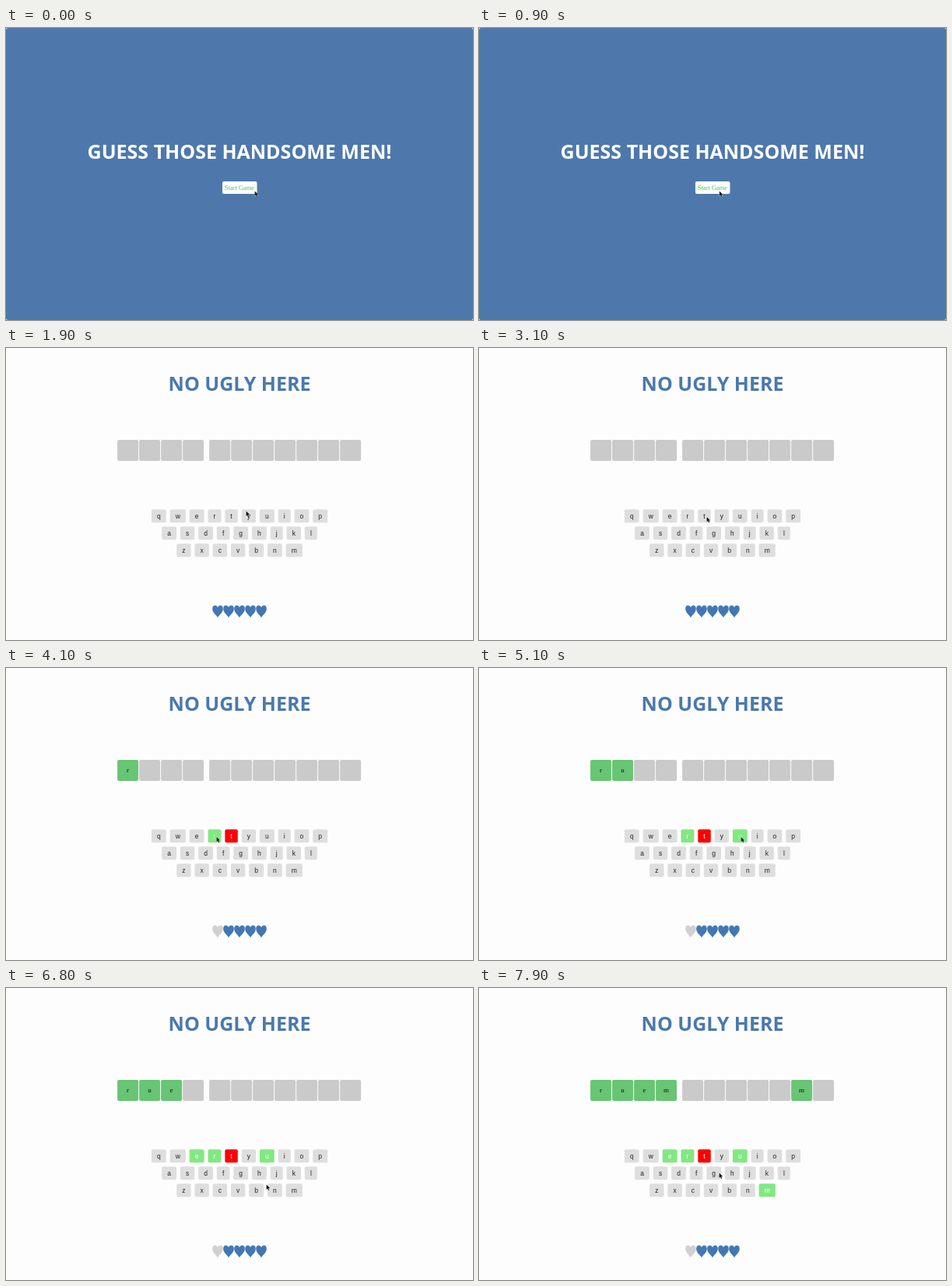
Recreate the animation shown at these times as an HTML page with a canvas. Size 600x375 px, loop 8 s.

```html
<!DOCTYPE html>
<html lang="en">
<head>
<meta charset="utf-8">
<title>Guessing game</title>
<style>
  html, body { margin: 0; width: 100%; height: 100%; overflow: hidden; background: #fdfdfd; }
  canvas { display: block; width: 600px; height: 375px; }
</style>
</head>
<body>
<canvas id="stage" width="600" height="375"></canvas>
<script>
const ctx = document.getElementById('stage').getContext('2d');
const LOOP = 8000, GAME_START = 1900;
const BLUE = '#4a78b0';
const TITLE = 'bold 25px "Open Sans", sans-serif';
const SERIF = '"Liberation Serif", serif';
const KEY_FONT = '8.5px "Liberation Sans", sans-serif';

// each pressed key: time and the tiles it fills
const PRESSES = {
  t: { at: 3400, tiles: [] },
  r: { at: 4000, tiles: [0] },
  u: { at: 4900, tiles: [1] },
  e: { at: 6450, tiles: [2] },
  m: { at: 7350, tiles: [3, 9] }
};

function box(x, y, w, h, fill, r = 2) {
  ctx.fillStyle = fill;
  ctx.beginPath();
  ctx.roundRect(x, y, w, h, r);
  ctx.fill();
}

function label(text, x, y, font, fill) {
  ctx.font = font;
  ctx.fillStyle = fill;
  ctx.fillText(text, x, y);
}

function layoutKeys() {
  const gap = 4.9, padding = 14.1;
  ctx.font = KEY_FONT;
  return ['qwertyuiop', 'asdfghjkl', 'zxcvbnm'].flatMap((row, i) => {
    const widths = [...row].map(c => ctx.measureText(c).width + padding);
    const total = widths.reduce((a, b) => a + b) + gap * (row.length - 1);
    let x = 300 - total / 2;
    return [...row].map((letter, j) => {
      const key = { letter, x, y: 207.3 + 22 * i, w: widths[j], h: 17 };
      x += key.w + gap;
      return key;
    });
  });
}

// The pointer rests on every key around its press and wanders in between.
function planRoute() {
  const stops = [
    { at: 0, x: 320, y: 210 },
    { at: 1000, x: 309, y: 210 },
    { at: 2000, x: 309, y: 210 },
    { at: 2400, x: 335, y: 216 },
    { at: 5800, x: 243, y: 229 },
    { at: 6800, x: 335, y: 253 },
    { at: 7900, x: 309, y: 238 },
    { at: LOOP, x: 309, y: 238 }
  ];
  for (const { letter, x, y, w } of keys) {
    const press = PRESSES[letter];
    if (!press) continue;
    for (const offset of [-250, 150])
      stops.push({ at: press.at + offset, x: x + w / 2 + 3, y: y + 10 });
  }
  return stops.sort((a, b) => a.at - b.at);
}

function pointerAt(t) {
  const i = route.findIndex(stop => stop.at > t);
  const a = route[i - 1], b = route[i];
  const u = (t - a.at) / (b.at - a.at), k = u * u * (3 - 2 * u);
  return [a.x + (b.x - a.x) * k, a.y + (b.y - a.y) * k];
}

function drawPointer([x, y]) {
  ctx.save();
  ctx.translate(x - 0.4, y - 0.4);
  const arrow = new Path2D('M0 0V6.3L1.5 5L2.5 7.3L3.6 6.8L2.6 4.6L4.5 4.5Z');
  ctx.strokeStyle = '#ffffffb0';
  ctx.stroke(arrow);
  ctx.fillStyle = '#111';
  ctx.fill(arrow);
  ctx.restore();
}

function drawHeart(x, fill) {
  ctx.save();
  ctx.translate(x, 330.3);
  ctx.fillStyle = fill;
  ctx.fill(new Path2D('M0 3C-1.2-.8-6.8-.8-6.8 4.6C-6.8 9.6-2.2 11.8 0 15.9C2.2 11.8 6.8 9.6 6.8 4.6C6.8-.8 1.2-.8 0 3Z'));
  ctx.restore();
}

function drawStart() {
  box(0, 0, 600, 375, '#4e78ac', 2.5);
  label('GUESS THOSE HANDSOME MEN!', 300, 168, TITLE, '#fff');
  box(278, 197, 44.5, 16, '#fff');
  label('Start Game', 300, 207.6, '8.4px ' + SERIF, '#4cc552');
}

function drawTiles(t) {
  const presses = Object.entries(PRESSES);
  for (let i = 0; i < 11; i++) {
    const x = 143.1 + 28 * i + (i > 3 ? 6 : 0);
    const found = presses.find(([, p]) => t >= p.at && p.tiles.includes(i));
    box(x, 118, 27, 27, found ? '#68c573' : '#cacaca');
    if (found) label(found[0], x + 13.5, 134, '9px ' + SERIF, '#111');
  }
}

function drawKeys(t, [px, py]) {
  for (const { letter, x, y, w, h } of keys) {
    const press = PRESSES[letter];
    const done = press && t >= press.at;
    const hit = done && press.tiles.length;
    const hover = px >= x && px <= x + w && py >= y && py <= y + h;
    box(x, y, w, h, !done ? '#dedede' : hit ? '#82e882' : '#f00');
    label(letter, x + w / 2, y + 11.2, KEY_FONT, !done ? '#222' : hit && hover ? '#c4f6c4' : '#fff');
  }
}

function drawGame(t, pointer) {
  label('NO UGLY HERE', 300, 54.8, TITLE, BLUE);
  drawTiles(t);
  drawKeys(t, pointer);
  for (let i = 0; i < 5; i++)
    drawHeart(272 + 14 * i, i === 0 && t >= PRESSES.t.at ? '#d0d0d0' : '#4377b3');
}

function draw(t) {
  const pointer = pointerAt(t);
  box(0, 0, 600, 375, '#fdfdfd', 0);
  if (t < GAME_START) drawStart();
  else drawGame(t, pointer);
  drawPointer(pointer);
}

ctx.textAlign = 'center';
const keys = layoutKeys();
const route = planRoute();
const begin = performance.now();
function frame() {
  draw((performance.now() - begin) % LOOP);
  requestAnimationFrame(frame);
}
frame();
</script>
</body>
</html>
```
